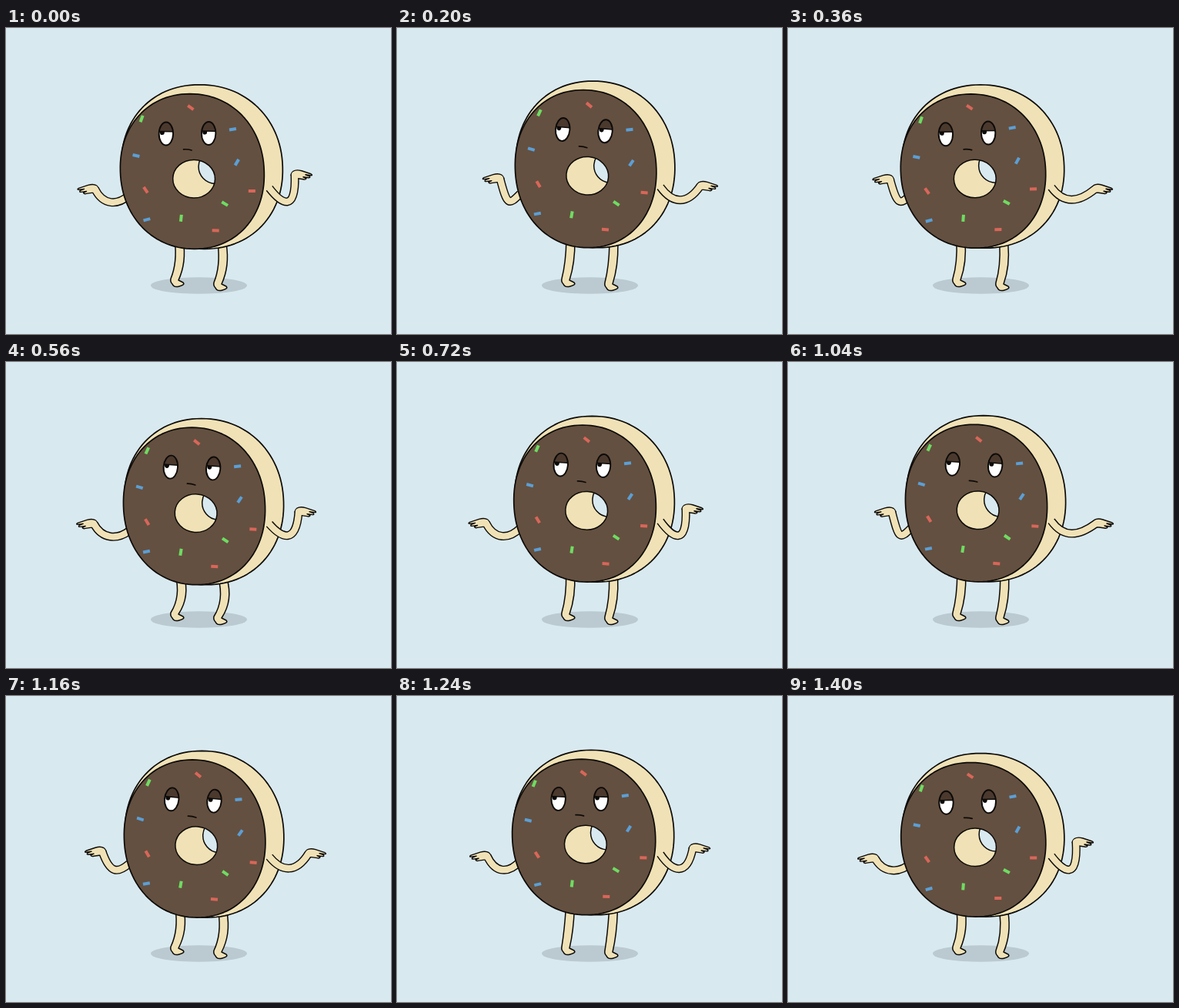
Write an HTML page with a canvas that moves like this. It is 500 px wide and 398 px high and loops after 1440 ms.

```html
<!DOCTYPE html>
<html lang="en">
<head>
<meta charset="utf-8">
<title>Shrugging donut</title>
<style>
html, body { margin: 0; overflow: hidden; background: #d9e9f0; }
canvas { display: block; }
</style>
</head>
<body>
<canvas id="stage" width="500" height="398"></canvas>
<script>
const ctx = document.getElementById('stage').getContext('2d');
const SKY = '#d9e9f0', SHADOW = '#bbcad1', DOUGH = '#f0e2b6', ICING = '#645040', LID = '#4b392e', INK = '#0c0a08';
const LOOP = 1440, STEP = 40;

// x, y, degrees of each sprinkle, by colour
const SPRINKLES = {
  '#d9665a': [[238, 103.5, 35], [181, 211.5, 55], [319, 211, 0], [272.5, 263, 0]],
  '#6fdc62': [[174.5, 119, 110], [284, 228, 30], [227.5, 247.5, 95]],
  '#5b9fd6': [[293, 131, -10], [299, 174, -60], [168, 167, 12], [183, 250, -15]]
};
const HAND = new Path2D('M-5 0C-3 -6 2 -7 9 -5L21 -1Q24 1 21 1L14 0L19 2Q21 4 18 4L11 3L15 5Q14 7 11 6L4 5L-3 5Z');
const MOUTH = new Path2D('M229.5 158Q235 157.5 240 159');

const rad = deg => deg * Math.PI / 180;

// Cosine that reaches 1 at the given time
const wave = (t, period, peak) => Math.cos(2 * Math.PI * (t - peak) / period);

function paint(path, fill, width = 1.5) {
  if (fill) { ctx.fillStyle = fill; ctx.fill(path); }
  if (width) { ctx.lineWidth = width; ctx.strokeStyle = INK; ctx.stroke(path); }
}

function oval(x, y, rx, ry) {
  const path = new Path2D();
  path.ellipse(x, y, rx, ry, 0, 0, 2 * Math.PI);
  return path;
}

// Slightly squared oval, leaning left towards its top
function disc(left, top, right, bottom) {
  const path = new Path2D();
  const bulge = v => Math.sign(v) * Math.abs(v) ** 0.95;
  const rx = (right - left) / 2, ry = (bottom - top) / 2;
  for (let deg = 0; deg < 360; deg += 3) {
    const dy = ry * bulge(Math.sin(rad(deg)));
    path.lineTo(left + rx + rx * bulge(Math.cos(rad(deg))) + 0.03 * dy, top + ry + dy);
  }
  path.closePath();
  return path;
}

function at(x, y, draw) {
  ctx.save();
  ctx.translate(x, y);
  draw();
  ctx.restore();
}

function arm(shoulder, c1, c2, wrist, side) {
  const path = new Path2D();
  path.moveTo(...shoulder);
  path.bezierCurveTo(...c1, ...c2, ...wrist);
  ctx.lineCap = 'butt';
  paint(path, null, 11);
  at(...wrist, () => {
    ctx.scale(side, 1);
    paint(HAND, DOUGH, 1.4);
  });
  ctx.lineCap = 'round';
  ctx.lineWidth = 8.2;
  ctx.strokeStyle = DOUGH;
  ctx.stroke(path);
}

// Knees bend as the body sinks
function legs(turn, lift) {
  const hip = 219 + turn, knee = 222 + 2 * lift;
  const leg = new Path2D(`M${hip} 276Q${knee} 305 214 326Q213 330 216 333Q218 338 225 336
    Q233 334 230 331L224 328Q${knee + 12} 305 ${hip + 11} 276`);
  paint(leg, DOUGH);
  at(56, 5, () => paint(leg, DOUGH));
}

function eye(x, y) {
  const ball = oval(x, y, 9.2, 15);
  ctx.save();
  ctx.clip(ball);
  paint(ball, '#fff', 0);
  paint(oval(x - 5, y - 2, 3, 3.6), INK, 0);
  const lid = new Path2D();
  lid.rect(x - 12, y - 18, 24, 15);
  paint(lid, LID);
  ctx.restore();
  paint(ball, null, 1.9);
}

function face(turn) {
  ctx.translate(240, 240 - 2.5 * turn);
  ctx.rotate(rad(5.3 * turn));
  ctx.translate(-240, -240);
  for (const [colour, spots] of Object.entries(SPRINKLES)) {
    ctx.fillStyle = colour;
    for (const [x, y, angle] of spots) at(x, y, () => {
      ctx.rotate(rad(angle));
      ctx.fillRect(-4.5, -2, 9, 4);
    });
  }

  const hole = oval(243.5, 196.3 - turn, 27.4, 24.8);
  paint(hole, DOUGH, 0);
  ctx.save();
  ctx.clip(hole);
  paint(oval(271 + 2 * turn, 180, 22, 22), SKY);
  ctx.restore();
  paint(hole);

  eye(206.5, 138);
  eye(261.8, 137 - 1.5 * turn);
  paint(MOUTH, null, 1.7);
}

function body(turn) {
  paint(disc(149 + 6 * turn, 74 - 4 * turn, 359 + 2 * turn, 287), DOUGH, 1.7);
  paint(disc(147.5 + 6.5 * turn, 86 - 4.5 * turn, 335 + 2 * turn, 287), ICING, 1.7);
  face(turn);
}

function draw(t) {
  const turn = 0.4 + 0.63 * wave(t, LOOP / 3, 152);
  const lift = 2 * wave(t, LOOP / 5, -12) - 1.3 * wave(t, LOOP, 0) - 0.3;
  const left = wave(t, LOOP / 2, 270), right = wave(t, LOOP / 2, 315);

  ctx.fillStyle = SKY;
  ctx.fillRect(0, 0, 500, 398);
  paint(oval(250.5, 335, 62.5, 10.8), SHADOW, 0);
  legs(turn, lift);
  arm([160, 217 + lift], [145, 231], [134 + 11 * left, 231], [124 + 12 * left, 203 - 9 * left], -1);
  at(0, lift, () => body(turn));
  arm([342, 208 + lift], [358, 229], [377, 234 - 7 * right], [387 + 13 * right, 200 + 10 * right], 1);
}

ctx.lineJoin = 'round';
function tick() {
  draw(Math.floor(performance.now() % LOOP / STEP) * STEP);
  requestAnimationFrame(tick);
}
tick();
</script>
</body>
</html>
```
